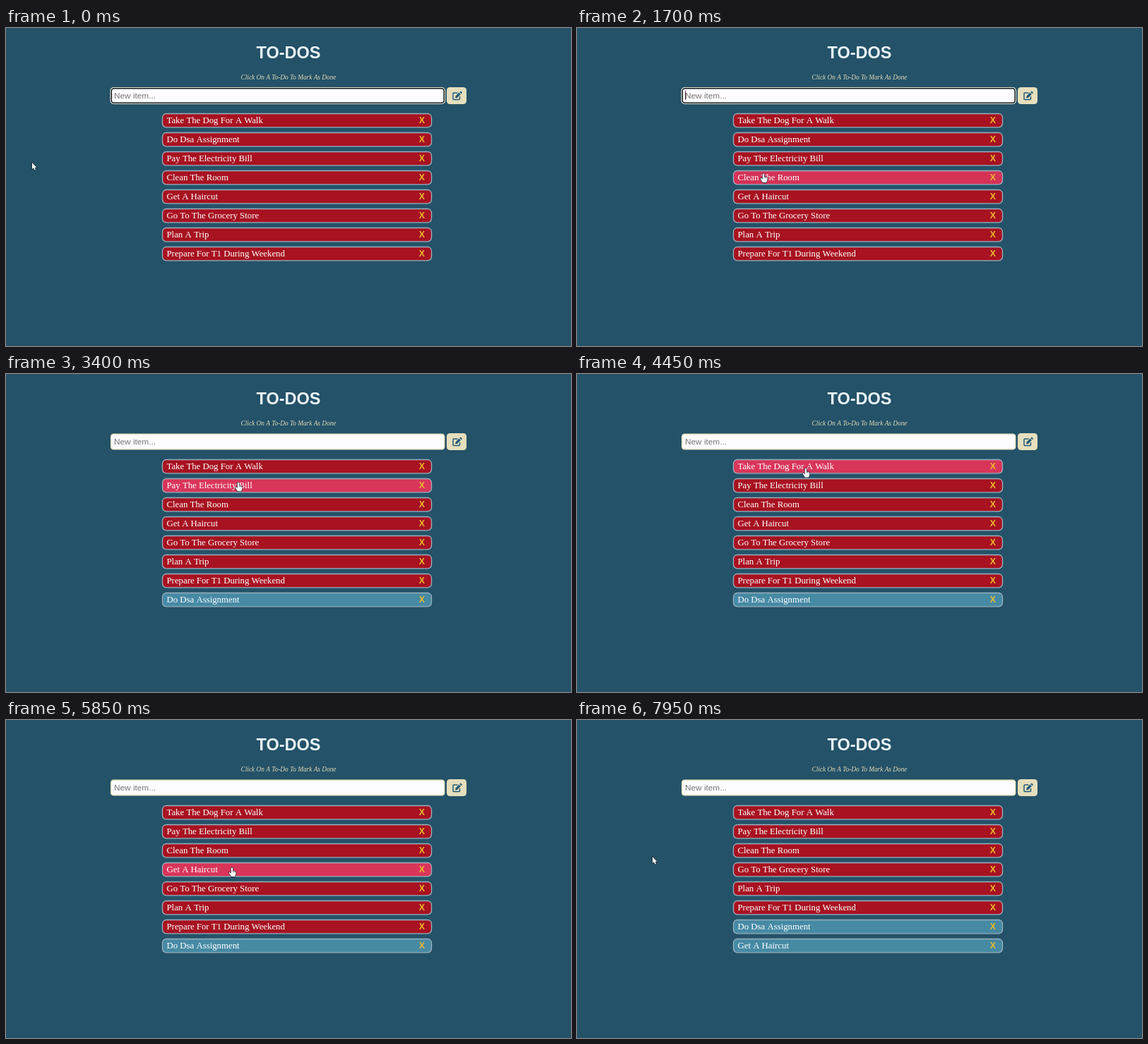
Write an HTML page with a canvas that moves like this. It is 800 by 451 pixels and loops after 8000 ms.

```html
<!DOCTYPE html>
<html lang="en">
<head>
<meta charset="utf-8">
<title>To-dos</title>
<style>
html, body { margin: 0; width: 100%; height: 100%; overflow: hidden; background: #245268; }
canvas { display: block; }
</style>
</head>
<body>
<canvas id="stage" width="800" height="451"></canvas>
<script>
const ctx = document.getElementById('stage').getContext('2d');
const LOOP = 8000, FADE = 260, STEP = 10;
const SERIF = '"Liberation Serif", serif';
const SANS = '"Liberation Sans", sans-serif';
const BG = '#245268', BEIGE = '#e6dfbd';
const RED = [168, 18, 33], PINK = [217, 53, 90], TEAL = [70, 138, 164];

const tasks = ['Take The Dog For A Walk', 'Do Dsa Assignment', 'Pay The Electricity Bill',
  'Clean The Room', 'Get A Haircut', 'Go To The Grocery Store', 'Plan A Trip',
  'Prepare For T1 During Weekend'];

// Each click sends a task to the end and turns one more slot teal.
const clicks = [{ at: 2750, task: 1, slot: 7 }, { at: 6150, task: 4, slot: 6 }];

// Pointer stops: time, x, y
const path = [
  [0, 37, 191], [500, 37, 191], [1300, 73, 202], [1470, 222, 207], [1700, 264, 206],
  [2150, 278, 205], [2600, 329, 154], [3850, 329, 153], [4300, 325, 133], [4700, 322, 134],
  [4780, 321, 141], [4800, 320, 148], [4960, 317, 168], [5000, 315, 174],
  [5400, 318, 189], [5560, 319, 203], [5850, 320, 209], [6700, 320, 209],
  [6935, 222, 211], [6950, 195, 211], [7200, 107, 194], [LOOP, 107, 194]
];

const clamp = v => Math.max(0, Math.min(1, v));
const mix = (a, b, k) => a.map((v, i) => v + (b[i] - v) * k);
const rgb = c => `rgb(${c.map(Math.round).join()})`;
const rowTop = slot => 121.5 + slot * 27;

function pointerAt(t) {
  const i = path.findIndex(p => p[0] > t);
  const a = path[i - 1], b = path[i];
  const k = (t - a[0]) / (b[0] - a[0]);
  return { x: a[1] + (b[1] - a[1]) * k, y: a[2] + (b[2] - a[2]) * k };
}

function slotAt({ x, y }) {
  if (x < 221 || x > 603) return -1;
  return tasks.findIndex((_, s) => y >= rowTop(s) - 0.5 && y <= rowTop(s) + 20);
}

// Hover strength of every slot, stepped through the loop up to t.
function hoverAt(t) {
  const heat = tasks.map(() => 0);
  for (let u = 0; u <= t; u += STEP) {
    const over = slotAt(pointerAt(u));
    heat.forEach((h, s) => { heat[s] = clamp(h + (s === over ? 1 : -1) * STEP / FADE); });
  }
  return heat;
}

function orderAt(t) {
  const list = tasks.slice();
  for (const c of clicks) {
    if (t >= c.at) list.push(...list.splice(list.indexOf(tasks[c.task]), 1));
  }
  return list;
}

function box(x, y, w, h, r, fill, stroke, line = 1) {
  ctx.beginPath();
  ctx.roundRect(x, y, w, h, r);
  if (fill) { ctx.fillStyle = fill; ctx.fill(); }
  if (stroke) { ctx.strokeStyle = stroke; ctx.lineWidth = line; ctx.stroke(); }
}

function text(str, x, y, font, color, align = 'left') {
  ctx.font = font;
  ctx.fillStyle = color;
  ctx.textAlign = align;
  ctx.fillText(str, x, y);
}

function drawInput(t) {
  const focused = t < clicks[0].at;
  if (focused) {
    box(148, 84.5, 473.5, 23, 4.5, '#fff', '#e9e6d2', 1.2);
    box(149.3, 85.8, 470.9, 20.4, 3.5, '#fdfcff', '#10181e', 1.5);
  } else {
    box(148.7, 85.2, 472, 21.6, 3.5, '#fdfcff', BEIGE, 1.5);
  }
  text('New item...', 153, 100, `11.8px ${SANS}`, '#757575');
  if (focused && t >= 600 && (t - 600) % 1000 < 500) {
    ctx.fillStyle = '#5a3038';
    ctx.fillRect(153, 89, 1, 13);
  }
}

function drawButton() {
  box(624, 84, 28, 24, 4.5, BEIGE);
  ctx.strokeStyle = ctx.fillStyle = '#235a78';
  ctx.lineWidth = 1.5;
  ctx.lineJoin = 'round';
  ctx.stroke(new Path2D('M639.5 92H634q-1 0-1 1v7.5q0 1 1 1h7.5q1 0 1-1V97'));
  ctx.fill(new Path2D('M636.5 96.5l5-5 2.4 2.4-5 5-2.7.4zM642.2 90.8l.8-.8q.7-.6 1.4 0l1.1 1.1q.6.7 0 1.4l-.8.8z'));
}

function drawRows(t) {
  const heat = hoverAt(t);
  orderAt(t).forEach((name, s) => {
    const done = clicks.find(c => c.slot === s);
    const k = done ? clamp((t - done.at) / FADE) : 0;
    const y = rowTop(s);
    box(221.5, y, 381, 19.3, 5.5, rgb(mix(mix(RED, PINK, heat[s]), TEAL, k)), '#9bb0bd', 1.3);
    text(name, 227.5, y + 13.5, `12.8px ${SERIF}`, '#fff');
    text('X', 588.8, y + 13, `bold 12.3px ${SANS}`, '#eab92b', 'center');
  });
}

function drawPointer(t) {
  const p = pointerAt(t);
  const hand = slotAt(p) >= 0;
  const shape = new Path2D(hand
    ? 'M-1.2 1Q0-.6 1.1 1V5l3 .6q1.6.4 1.5 2L5 10.8 4 13H-1L-4 8.4q-.6-1.5.8-1.4l2 1.5z'
    : 'M0 0V9L2 7.3 3.5 10.5 5 9.8 3.6 6.8H6.3z');
  ctx.save();
  ctx.translate(p.x, p.y);
  ctx.lineJoin = 'round';
  ctx.lineWidth = 1.3;
  ctx.strokeStyle = '#17222a';
  ctx.stroke(shape);
  ctx.fillStyle = '#fff';
  ctx.fill(shape);
  if (hand) {
    ctx.lineWidth = 0.5;
    ctx.stroke(new Path2D('M1.1 5v2M2.7 5.4v1.8M4.2 5.8v1.6'));
  }
  ctx.restore();
}

function draw(t) {
  ctx.fillStyle = BG;
  ctx.fillRect(0, 0, 800, 451);
  text('TO-DOS', 400, 43, `bold 23.5px ${SANS}`, '#eaf3fa', 'center');
  text('Click On A To-Do To Mark As Done', 400, 72.5, `italic 9.3px ${SERIF}`, '#e0dab9', 'center');
  drawInput(t);
  drawButton();
  drawRows(t);
  drawPointer(t);
}

const start = performance.now();
function tick() {
  const t = (performance.now() - start) % LOOP;
  draw(Math.floor(t / 50) * 50);
  requestAnimationFrame(tick);
}
tick();
</script>
</body>
</html>
```
